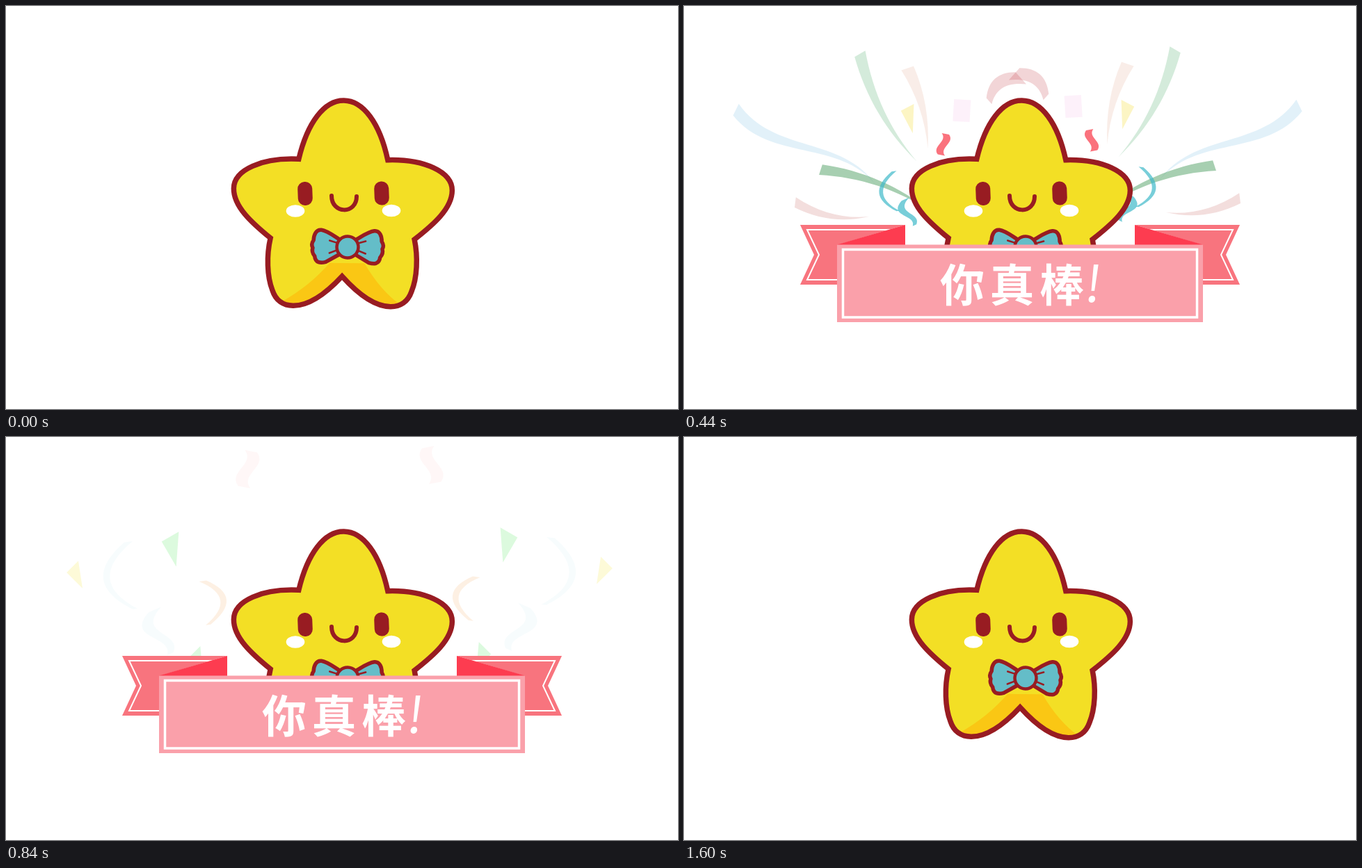
An HTML page with a canvas for the animation above (1640 ms loop, 966 px wide and 580 px high).

```html
<!DOCTYPE html>
<html lang="zh-CN">
<head>
<meta charset="utf-8">
<style>
  html, body { margin: 0; width: 100%; height: 100%; overflow: hidden; background: #fff; }
  canvas { display: block; }
</style>
</head>
<body>
<canvas id="stage" width="966" height="580"></canvas>
<script>
const ctx = document.getElementById('stage').getContext('2d');
const LOOP = 1640, STEP = 40;
const DARK = '#981c22', YELLOW = '#f3df25', ORANGE = '#fac714', TEAL = '#64bdc8';
const PINK = '#faa0aa', CORAL = '#f8747e', RED = '#fd3c50';
const BURST = { x: 390, y: 300 };

const easeOut = p => 1 - (1 - Math.min(1, Math.max(0, p))) ** 2;
const mix = (a, b, u) => a + (b - a) * u;

function fill(path, color) {
  ctx.fillStyle = color;
  ctx.fill(path);
}

function stroke(path, color, width) {
  ctx.strokeStyle = color;
  ctx.lineWidth = width;
  ctx.stroke(path);
}

// Runs draw once as it is and once reflected, so that x becomes width - x.
function bothSides(width, dy, draw) {
  draw();
  ctx.save();
  ctx.transform(-1, 0, 0, 1, width, dy);
  draw();
  ctx.restore();
}

// A band of paper along (dx, dy), cut square at the start; `end` is the width left at its far end.
function band(dx, dy, width, { arc = 0, wave = 0, end = 0 } = {}) {
  const length = Math.hypot(dx, dy), path = new Path2D();
  const near = [0, 1, 2, 3].map(i => {
    const bend = i === 1 ? arc + wave : i === 2 ? arc - wave : 0;
    return [dx * i / 3 - dy * bend, dy * i / 3 + dx * bend];
  });
  const far = near.map(([x, y], i) => {
    const w = width * mix(1, end, i / 3) / length;
    return [x + dy * w, y - dx * w];
  });
  path.moveTo(...near[0]);
  path.lineTo(...far[0]);
  path.bezierCurveTo(...far.slice(1).flat());
  path.lineTo(...near[3]);
  path.bezierCurveTo(...near[2], ...near[1], ...near[0]);
  return path;
}

const paper = (color, x, y, shape) => ({ color, x, y, shape });
const strip = { wave: -.35, end: 1 };

const waves = [
  { start: 0, life: 640, pieces: [
    paper('#6bb9e1', 36, 142, band(221, 108, 20, { wave: .16 })),
    paper('#e1a38b', 304, 70, band(41, 121, 20, { arc: -.08 })),
    paper('#bf5954', 134, 289, band(115, 14, 16, { arc: .12 })),
    paper('#bc2a34', 486, 73, band(-45, 40, 25, { arc: .3, end: .5 })),
    paper('#f5b8e4', 388, 116, band(-2, 34, 26, { end: 1 }))
  ] },
  { start: 180, life: 540, pieces: [
    paper('#93cda5', 192, -10, band(110, 185, 22, { arc: .09 })),
    paper('#25873e', 122, 222, band(200, 66, 19, { arc: -.09 })),
    paper('#f8e66b', 283, 96, band(21, 40, 26))
  ] },
  { start: 300, life: 600, pieces: [
    paper('#f83443', 343, 16, band(-10, 52, 18, strip)),
    paper('#3cb9c8', 168, 150, band(12, 97, 12, { arc: .5, end: .6 })),
    paper('#3cb9c8', 203, 252, band(27, 62, 20, { arc: .2, wave: .5, end: .5 }))
  ] },
  { start: 380, life: 440, pieces: [
    paper('#f7006e', 423, 76, band(-16, 72, 23, strip)),
    paper('#9893c2', 393, 29, band(-25, 149, 18, { wave: -.15 }))
  ] },
  { start: 400, life: 600, pieces: [
    paper('#f3dd05', 64, 187, band(24, 24, 25)),
    paper('#21de31', 211, 139, band(22, 38, 30)),
    paper('#21de31', 252, 320, band(22, 22, 26)),
    paper('#f2a04b', 269, 201, band(10, 66, 11, { arc: -.55, end: .7 }))
  ] }
];

function drawConfetti(t) {
  for (const { start, life, pieces } of waves) {
    const p = (t - start) / life;
    if (p <= 0 || p >= 1) continue;
    const e = easeOut(p), scale = mix(.3, 1, e);
    ctx.globalAlpha = (1 - p) ** 1.4;
    for (const { color, x, y, shape } of pieces) {
      bothSides(959, -6, () => {
        ctx.save();
        ctx.translate(mix(BURST.x, x, e), mix(BURST.y, y, e));
        ctx.scale(scale, scale);
        fill(shape, color);
        ctx.restore();
      });
    }
  }
  ctx.globalAlpha = 1;
}

// Closes a chain of Bezier points with its reflection in x = 0.
function symmetric(points) {
  const back = points.slice(0, -1).reverse().map(([x, y]) => [-x, y]);
  const path = new Path2D(), chain = [...points.slice(1), ...back];
  path.moveTo(...points[0]);
  for (let i = 0; i < chain.length; i += 3) path.bezierCurveTo(...chain.slice(i, i + 3).flat());
  path.closePath();
  return path;
}

// Right half around the star's middle, from the top arm down to the notch between the feet.
const body = symmetric([
  [0, -164], [28, -164], [52, -132], [64, -79],
  [116, -81], [157, -63], [157, -36], [157, -10], [131, 13], [103.5, 35],
  [109, 60], [108, 90], [100, 110], [95, 125], [84, 132], [70, 132],
  [46, 132], [21, 112], [0, 89]
]);
const shade = new Path2D('M0 70H-18Q-46 103-84 125L-73 140L0 92L73 140L84 129Q56 110 32 70Z');
const smile = new Path2D('M468 273C468 300 504 300 504 274');
const wing = new Path2D('M12-11C22-17 30-23 38-24C46-25 49-16 49-9Q53-3 50 2Q52 8 47 14C46 24 38 24 31 22L12 11Z');
const creases = new Path2D('M16-6L26-9M16 5L26 9');

function ellipse(x, y, rx, ry) {
  const path = new Path2D();
  path.ellipse(x, y, rx, ry, 0, 0, Math.PI * 2);
  return path;
}

function drawEye(x, y) {
  const eye = new Path2D();
  eye.roundRect(-10.5, -17, 21, 34, 10);
  ctx.save();
  ctx.translate(x, y);
  ctx.rotate(-.04);
  fill(eye, DARK);
  ctx.restore();
}

function drawBow() {
  const knot = ellipse(0, 0, 15.5, 15.5);
  ctx.save();
  ctx.translate(491, 347);
  ctx.rotate(.02);
  bothSides(0, 0, () => {
    fill(wing, TEAL);
    stroke(wing, DARK, 5.5);
    stroke(creases, DARK, 2.5);
  });
  fill(knot, TEAL);
  stroke(knot, DARK, 4.5);
  ctx.restore();
}

function drawStar() {
  ctx.save();
  ctx.translate(484, 300);
  ctx.rotate(.01);
  fill(body, YELLOW);
  ctx.save();
  ctx.clip(body);
  fill(shade, ORANGE);
  ctx.restore();
  stroke(body, DARK, 7.5);
  ctx.restore();

  drawEye(430, 270);
  drawEye(540, 269.5);
  fill(ellipse(416, 295, 13.3, 8.7), '#fff');
  fill(ellipse(554, 294.5, 13.3, 8.7), '#fff');
  ctx.save();
  ctx.lineCap = ctx.lineJoin = 'round';
  stroke(smile, DARK, 6);
  drawBow();
  ctx.restore();
}

const tail = new Path2D('M167 315H318L220 344V401H167L187 358Z');
const tailLine = new Path2D('M297 322H177L194 358L177 394H221');
const fold = new Path2D('M318 315V345H220V343.5Z');

function drawText() {
  const family = '"Noto Sans CJK SC", "Noto Sans CJK", sans-serif';
  ctx.fillStyle = '#fff';
  ctx.textAlign = 'center';
  ctx.font = '700 64px ' + family;
  [...'你真棒'].forEach((char, i) => ctx.fillText(char, 400 + i * 71.5, 425));
  ctx.save();
  ctx.transform(1, 0, -.12, 1, 586, 426);
  ctx.font = '500 72px ' + family;
  ctx.fillText('!', 0, 0);
  ctx.restore();
}

function drawBanner(t) {
  const open = t < LOOP / 2 ? easeOut(t / 440) : 1 - easeOut((t - 1160) / 440);
  if (open <= 0) return;
  const half = 322 * open;
  ctx.save();
  ctx.beginPath();
  ctx.rect(477 - half, 300, half * 2, 170);
  ctx.clip();
  bothSides(966, 0, () => {
    fill(tail, CORAL);
    stroke(tailLine, '#fff', 2);
    fill(fold, RED);
  });
  ctx.fillStyle = PINK;
  ctx.fillRect(220, 343.5, 526, 111.5);
  ctx.strokeStyle = '#fff';
  ctx.lineWidth = 3.5;
  ctx.strokeRect(228.5, 350.5, 509, 97.5);
  drawText();
  ctx.restore();
}

function frame() {
  const t = Math.floor(performance.now() % LOOP / STEP) * STEP;
  ctx.fillStyle = '#fff';
  ctx.fillRect(0, 0, 966, 580);
  drawConfetti(t);
  drawStar();
  drawBanner(t);
  requestAnimationFrame(frame);
}
frame();
</script>
</body>
</html>
```
